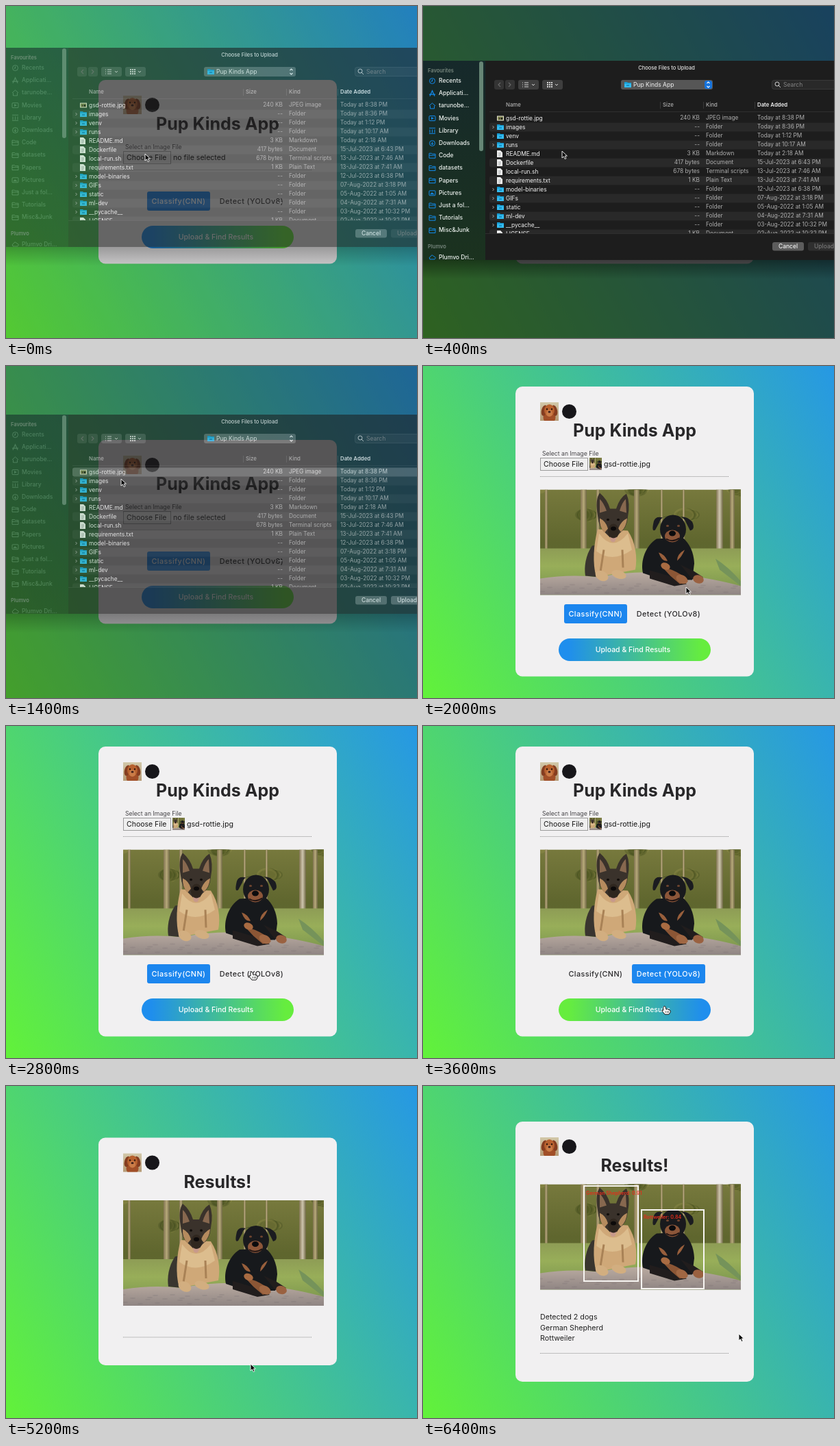
Write an HTML page with a canvas that moves like this. It is 600 px wide and 485 px high and loops after 6600 ms.

```html
<!DOCTYPE html>
<html lang="en">
<head>
<meta charset="utf-8">
<title>Dog classifier demo</title>
<style>
  html, body { margin: 0; width: 100%; height: 100%; overflow: hidden; }
  canvas { display: block; }
</style>
</head>
<body>
<canvas id="stage" width="600" height="485"></canvas>
<script>
const W = 600, H = 485, LOOP = 6600, STEP = 200;
const APP = 'Pup Kinds App';
const stage = document.getElementById('stage').getContext('2d');
const sheet = document.createElement('canvas');
sheet.width = W;
sheet.height = H;
const sheetCtx = sheet.getContext('2d');
let c = stage;

// Drawing helpers
function rect(x, y, w, h, fill) {
  c.fillStyle = fill;
  c.fillRect(x, y, w, h);
}
function round(x, y, w, h, r, fill, stroke) {
  c.beginPath();
  c.roundRect(x, y, w, h, r);
  if (fill) { c.fillStyle = fill; c.fill(); }
  if (stroke) { c.strokeStyle = stroke; c.stroke(); }
}
function oval(x, y, rx, ry, fill, turn = 0) {
  c.beginPath();
  c.ellipse(x, y, rx, ry, turn, 0, Math.PI * 2);
  c.fillStyle = fill;
  c.fill();
}
function shape(d, fill, stroke, width = 1) {
  const path = new Path2D(d);
  if (fill) { c.fillStyle = fill; c.fill(path); }
  if (stroke) { c.strokeStyle = stroke; c.lineWidth = width; c.stroke(path); }
}
function text(s, x, y, size, fill, { weight = 400, align = 'left', spacing = 0, base = 'alphabetic' } = {}) {
  c.font = `${weight} ${size}px Inter, sans-serif`;
  c.textAlign = align;
  c.textBaseline = base;
  c.letterSpacing = spacing + 'px';
  c.fillStyle = fill;
  c.fillText(s, x, y);
}
function blend(x0, y0, x1, y1, ...colors) {
  const g = c.createLinearGradient(x0, y0, x1, y1);
  colors.forEach((color, i) => g.addColorStop(i / (colors.length - 1), color));
  return g;
}
function at(x, y, draw, scale = 1) {
  c.save();
  c.translate(x, y);
  c.scale(scale, scale);
  draw();
  c.restore();
}
function faded(alpha, draw) {
  c.save();
  c.globalAlpha = alpha;
  draw();
  c.restore();
}

// Linear interpolation over rows of [time, ...values]
function track(keys, t) {
  const i = keys.findIndex(k => k[0] > t);
  if (i < 0) return keys[keys.length - 1].slice(1);
  const a = keys[i - 1], b = keys[i], f = (t - a[0]) / (b[0] - a[0]);
  return a.slice(1).map((v, n) => v + (b[n + 1] - v) * f);
}

function background() {
  const angle = Math.PI / 3, dx = Math.sin(angle), dy = -Math.cos(angle);
  const half = (W * dx - H * dy) / 2;
  rect(0, 0, W, H, blend(W / 2 - dx * half, H / 2 - dy * half,
    W / 2 + dx * half, H / 2 + dy * half, '#62f239', '#2698e4'));
}

// Picture of two dogs on a rock, 293 x 154
function shepherd() {
  shape('M76 82C66 96 64 114 66 126L96 129L94 80Z', '#39352f');
  shape('M84 58C78 80 76 108 82 128L139 117C142 100 140 78 128 60Z', '#cfa878');
  shape('M86 64Q106 92 128 64L134 88Q106 108 82 90Z', '#dcbd8e');
  shape('M93 88L88 120M120 88L121 114', null, '#a98256', 3);
  oval(90, 126, 10, 7, '#d2ae80', 0.5);
  oval(115, 124, 11, 6, '#d2ae80', 0.3);
  shape('M84 38Q80 14 87 5Q98 14 102 28L111 28Q116 12 126 6Q132 20 128 40Q127 56 116 64L107 75L97 65Q85 56 84 38Z', '#3a322b');
  shape('M87 14Q92 18 97 31L87 34ZM125 14Q120 18 116 31L126 34Z', '#87684f');
  shape('M87 42Q96 46 99 57L94 63Q86 54 87 42ZM127 42Q118 46 114 57L118 62Q126 54 127 42Z', '#b58b5e');
  oval(107, 61, 8, 11, '#30271f');
  oval(99, 44, 2, 1.7, '#120e0b');
  oval(114, 44, 2, 1.7, '#120e0b');
  oval(107, 57, 4, 3, '#0c0a0a');
  shape('M102 69Q107 73 112 69L109 76Q106 78 103 75Z', '#c89a8b');
}
function rottweiler() {
  shape('M170 72C154 82 146 104 150 122L180 132L222 132L225 108Q224 84 208 70Z', '#17191c');
  shape('M160 118L202 130L214 138L196 141L160 130ZM205 110L224 119L238 128L222 131Z', '#211d1d');
  shape('M173 92Q181 94 186 104Q178 106 173 92ZM211 88Q207 98 200 104Q200 94 211 88Z', '#985f3c');
  shape('M178 113Q193 116 207 125L216 134L204 138L190 126Z', '#8b5635');
  oval(183, 112, 7, 5, '#a86b42', 0.4);
  oval(207, 131, 9, 6, '#a06743', 0.5);
  oval(231, 131, 8, 6, '#9a6140', 0.3);
  shape('M166 46Q162 63 168 59L174 48Q176 38 193 38Q210 38 213 48L219 60Q227 58 222 47Q214 38 202 40Q190 36 179 41Q169 38 166 46Z', '#1b1c20');
  oval(194, 58, 19, 21, '#191a1d');
  oval(193, 68, 11, 9, '#8c5639');
  oval(193, 64, 5, 4, '#0b0b0d');
  shape('M184 72Q193 78 203 71', null, '#201413', 2);
  oval(186, 53, 2, 1.5, '#70452f');
  oval(202, 53, 2, 1.5, '#70452f');
}
function photo(x, y, scale = 1) {
  at(x, y, () => {
    c.beginPath();
    c.rect(0, 0, 293, 154);
    c.clip();
    rect(0, 0, 293, 154, blend(0, 0, 0, 154, '#77793d', '#5f662e', '#5d6a31'));
    for (let i = 0; i < 42; i++) {
      const px = (i * 73) % 293, py = (i * 37) % 74;
      oval(px, py, 8 + i % 8, 6 + i % 5, i % 3 ? 'rgba(61,73,27,.28)' : 'rgba(169,158,83,.24)');
    }
    [[7, 4], [59, 9], [82, 5], [137, 8], [176, 3], [208, 3], [257, 10], [277, 7]].forEach(([tx, tw], i) => {
      rect(tx, 0, tw, 90, blend(tx, 0, tx + tw, 0, '#817451', i === 6 ? '#cfc6af' : '#b6a87a', '#6d6742'));
    });
    rect(0, 86, 293, 68, blend(0, 84, 0, 140, '#8d9b55', '#98ae59', '#819b50'));
    shape('M256 101Q275 113 293 134L293 141L262 117Z', '#75935a');
    shape('M0 130Q45 123 85 128Q144 116 206 124Q258 131 293 141L293 154L0 154Z',
      blend(0, 122, 0, 154, '#b9aaa0', '#8f8583'));
    for (let i = 0; i < 35; i++) {
      oval((i * 47) % 293, 138 + i % 14, 4, 1, 'rgba(108,98,103,.18)');
    }
    shepherd();
    rottweiler();
  }, scale);
}
function avatar(x, y) {
  rect(x, y, 27, 27, blend(x, y, x, y + 27, '#d2c8a9', '#b59a75'));
  c.save();
  c.beginPath();
  c.rect(x, y, 27, 27);
  c.clip();
  oval(x + 13.5, y + 22, 9, 9, '#a14f28');
  oval(x + 6, y + 12, 4, 8, '#853d20', 0.25);
  oval(x + 21, y + 12, 4, 8, '#853d20', -0.25);
  oval(x + 13.5, y + 12, 7.5, 9, '#b7612f');
  oval(x + 13.5, y + 16, 4.5, 5, '#ca7c48');
  oval(x + 10, y + 10, 1.2, 1.2, '#30170d');
  oval(x + 17, y + 10, 1.2, 1.2, '#30170d');
  oval(x + 13.5, y + 14, 2, 1.5, '#40201a');
  c.restore();
}

// Web page
function card(y, h) {
  round(135, y, 348, h, 10, '#f1f0f1');
  avatar(171, y + 23);
  oval(213.5, y + 36.5, 10.5, 10.5, '#17161a');
}
function divider(y) {
  c.setLineDash([1, 1]);
  c.lineWidth = 1;
  c.strokeStyle = '#8c8c8c';
  c.beginPath();
  c.moveTo(171, y + 0.5);
  c.lineTo(447, y + 0.5);
  c.stroke();
  c.setLineDash([]);
}
function tab(label, x, w, y, active) {
  if (active) round(x, y, w, 28, 3, '#1c86ee');
  text(label, x + w / 2, y + 18, 10.8, active ? '#fff' : '#29282a',
    { weight: 500, align: 'center', spacing: 0.4 });
}
function formPage(loaded, detect, hover) {
  const y = loaded ? 30 : 108, controls = y + (loaded ? 318 : 163);
  card(y, loaded ? 423.5 : 268.5);
  text(APP, 309, y + 73, 25, '#282729', { weight: 700, align: 'center' });
  text('Select an Image File', 174, y + 101, 8.7, '#464548');
  c.lineWidth = 1;
  c.strokeStyle = '#9b9b9b';
  c.fillStyle = '#efefef';
  c.fillRect(171, y + 104, 69, 18);
  c.strokeRect(171.5, y + 104.5, 69, 18);
  text('Choose File', 176, y + 117, 10.5, '#161616');
  if (loaded) {
    c.save();
    c.beginPath();
    c.rect(243, y + 104, 18, 18);
    c.clip();
    photo(235, y + 104, 0.117);
    c.restore();
    text('gsd-rottie.jpg', 264, y + 117, 10.6, '#161616');
    photo(171, y + 150.5);
  } else {
    text('no file selected', 244, y + 117, 10.6, '#161616');
  }
  divider(y + 131);
  tab('Classify(CNN)', 206, 92, controls, !detect);
  tab('Detect (YOLOv8)', 305, 107, controls, detect);
  const ends = ['#1f8eed', '#66ed3e'];
  if (hover) ends.reverse();
  round(198, controls + 50, 222, 33, 16.5, blend(212, 0, 408, 0, ...ends));
  text('Upload & Find Results', 306.5, controls + 70, 10.5, '#fff', { weight: 500, align: 'center' });
}
function detection(label, x, y, w, h) {
  c.lineWidth = 2;
  c.strokeStyle = '#f7f5f2';
  c.strokeRect(x, y, w, h);
  text(label, x + 3, y + 13, 7.2, '#e12c1c', { weight: 600 });
}
function resultsPage(done) {
  const y = done ? 52 : 75.5;
  card(y, done ? 380 : 332.5);
  text('Results!', 309, y + 73, 25, '#282729', { weight: 700, align: 'center' });
  photo(171, y + 91.5);
  if (done) {
    detection('German Shepherd: 0.91', 235, 146, 79, 139);
    detection('Rottweiler: 0.84', 319, 181, 91, 115);
    ['Detected 2 dogs', 'German Shepherd', 'Rottweiler'].forEach((line, i) =>
      text(line, 171, y + 289 + i * 15.5, 10.7, '#202020'));
  }
  divider(y + (done ? 338 : 291));
}

// File chooser
const FILES = `gsd-rottie.jpg|240 KB|JPEG image|Today at 8:38 PM
images|--|Folder|Today at 8:36 PM
venv|--|Folder|Today at 1:12 PM
runs|--|Folder|Today at 10:17 AM
README.md|3 KB|Markdown|Today at 2:18 AM
Dockerfile|417 bytes|Document|15-Jul-2023 at 6:43 PM
local-run.sh|678 bytes|Terminal scripts|13-Jul-2023 at 7:46 AM
requirements.txt|1 KB|Plain Text|13-Jul-2023 at 7:41 AM
model-binaries|--|Folder|12-Jul-2023 at 6:38 PM
GIFs|--|Folder|07-Aug-2022 at 3:18 PM
static|--|Folder|05-Aug-2022 at 1:05 AM
ml-dev|--|Folder|04-Aug-2022 at 7:31 AM
__pycache__|--|Folder|03-Aug-2022 at 10:32 PM
LICENSE|1 KB|Document|02-Aug-2022 at 10:32 PM`.split('\n').map(line => line.split('|'));
const PLACES = ['Recents', 'Applicati...', 'tarunobe...', 'Movies', 'Library', 'Downloads', 'Code',
  'datasets', 'Papers', 'Pictures', 'Just a fol...', 'Tutorials', 'Misc&Junk'];
const mid = { base: 'middle' };

function folder(x, y) {
  shape(`M${x} ${y - 4}h4l1 1h5v7h-10z`, '#159bd3');
  rect(x, y - 1.5, 10, 5.5, '#35bcf0');
  rect(x + 3, y, 4, 2, '#178fc6');
}
function paper(x, y) {
  shape(`M${x + 1} ${y - 5}h5l3 3v7h-8z`, '#eeeeee');
  shape(`M${x + 3} ${y - 1}h4M${x + 3} ${y + 1}h4M${x + 3} ${y + 3}h3`, null, '#8d9295', 0.7);
}
function placeIcon(i, y, color) {
  if (i === 0 || i === 5) {
    shape(`M9.5 ${y}a4 4 0 1 0 8 0a4 4 0 1 0 -8 0`, null, color);
    shape(i ? `M13.5 ${y - 2}v4m-2 -2l2 2l2 -2` : `M13.5 ${y - 2.5}v3h-2`, null, color);
  } else if (i === 1) {
    shape(`M10 ${y + 4}l3.5 -8l3.5 8M9 ${y + 1.5}h9`, null, color, 1.2);
  } else if (i === 2) {
    shape(`M9 ${y}l4.5 -4l4.5 4M10.5 ${y}v4h6v-4`, null, color);
  } else if (i === 4) {
    shape(`M9 ${y - 4}h9M10 ${y - 2}v5M13.5 ${y - 2}v5M17 ${y - 2}v5M9 ${y + 4}h9`, null, color);
  } else if (i === 3 || i === 9) {
    c.lineWidth = 1;
    round(9, y - 3.5, 9, 7, 1, null, color);
    shape(i === 3 ? `M12 ${y - 2}l4 2l-4 2z` : `M10 ${y + 2}l3 -3l4 3z`, color);
  } else {
    shape(`M9 ${y - 3.5}h3.5l1 1h4.5v6h-9zM9 ${y - 0.5}h9`, null, color);
  }
}
function sidebar(active) {
  const icon = active ? '#128bed' : '#a9d8bd';
  const label = active ? '#edf2ef' : '#a9d8bd';
  round(82, 81, 6, 131, 3, '#668575');
  text('Favourites', 7, 94.5, 7.5, '#76867d', { ...mid, weight: 600 });
  text('Plumvo', 7, 352, 7.5, '#76867d', { ...mid, weight: 600 });
  faded(active ? 1 : 0.34, () => {
    PLACES.forEach((name, i) => {
      const y = 109.5 + i * 18.2;
      placeIcon(i, y, icon);
      text(name, 23, y, 8.5, label, { ...mid, weight: 500 });
    });
    shape('M10 370q-2 -3 1 -4q2 -4 5 0q4 1 1 4z', null, icon);
    text('Plumvo Dri...', 23, 367, 8.5, label, { ...mid, weight: 500 });
  });
}
function toolbar(active) {
  text('Choose Files to Upload', 355.5, 91, 7.5, '#e4e4e4', { ...mid, weight: 500, align: 'center' });
  round(104, 108, 14, 14, 3, 'rgba(255,255,255,.1)');
  round(120, 108, 14, 14, 3, 'rgba(255,255,255,.1)');
  shape('M113 112l-3 3l3 3M125 112l3 3l-3 3', null, '#6b6b6b', 1.1);
  round(139, 108, 30, 14, 3, 'rgba(255,255,255,.15)');
  round(174, 108, 30, 14, 3, 'rgba(255,255,255,.15)');
  shape('M148 112h6M148 115h6M148 118h6M145 112h1M145 115h1M145 118h1M159 114l2 2l2 -2M193 114l2 2l2 -2', null, '#d4d4d4');
  for (let i = 0; i < 9; i++) rect(181 + i % 3 * 3, 111 + Math.floor(i / 3) * 3, 2, 2, '#d4d4d4');
  round(289, 108, 134, 14, 3, 'rgba(255,255,255,.25)');
  folder(294, 115);
  text(APP, 307, 115, 8.5, '#f2f2f2', mid);
  if (active) round(411, 109, 11, 12, 3, '#1673dc');
  shape('M414.5 113l2 -2l2 2M414.5 117l2 2l2 -2', null, '#fff', 1.1);
  c.lineWidth = 1;
  round(509.5, 108.5, 95, 13, 3, 'rgba(255,255,255,.05)', 'rgba(255,255,255,.1)');
  shape('M514 114a3 3 0 1 0 6 0a3 3 0 1 0 -6 0M519 116l3 3', null, '#d0d0d0');
  text('Search', 526, 115, 8.5, '#858585', mid);
}
function columns() {
  [['Name', 121], ['Size', 350], ['Kind', 413], ['Date Added', 488]].forEach(([label, x], i) => {
    text(label, x, 145, 7.8, i === 3 ? '#f0f0f0' : '#b0b0b0', { ...mid, weight: i === 3 ? 600 : 500 });
    if (i) rect(x - 4, 140, 1, 10, 'rgba(255,255,255,.12)');
  });
  rect(97, 154, 503, 1, 'rgba(255,255,255,.08)');
}
function fileRow([name, size, kind, date], i, selected) {
  const y = 164 + i * 13;
  if (selected || i % 2) round(97, y - 6.5, 510, 13, 3, `rgba(255,255,255,${selected ? 0.24 : 0.05})`);
  if (i === 0) {
    rect(108, y - 3.5, 10, 7, '#e8e3d2');
    rect(109, y - 2.5, 8, 5, '#7a814b');
    rect(111, y - 1, 2, 3, '#514737');
    rect(114, y - 1, 2, 3, '#191919');
  } else if (kind === 'Folder') {
    shape(`M101.5 ${y - 2}l2 2l-2 2`, null, '#a6a6a6');
    folder(108, y);
  } else {
    paper(107, y);
  }
  const soft = selected ? '#e4e4e4' : '#b0b0b0';
  text(name, 121, y, 8.4, '#f4f4f4', mid);
  text(size, 404, y, 8.3, soft, { ...mid, align: 'right' });
  text(kind, 413, y, 8.3, soft, mid);
  text(date, 488, y, 8.3, soft, mid);
}
function chooser(selected, active, backing) {
  c = sheetCtx;
  c.clearRect(0, 0, W, H);
  faded(backing, () => {
    rect(91, 80, 509, 291, '#1d1d1d');
    rect(0, 80, 91, 291, blend(0, 80, 0, 371, '#16292b', '#1b321f'));
  });
  sidebar(active);
  toolbar(active);
  columns();
  c.save();
  c.beginPath();
  c.rect(91, 155, 509, 177);
  c.clip();
  FILES.forEach((file, i) => fileRow(file, i, selected && i === 0));
  c.restore();
  rect(91, 332, 509, 1, 'rgba(255,255,255,.08)');
  round(510, 345, 46, 12.5, 3, 'rgba(255,255,255,.28)');
  text('Cancel', 533, 351, 8.5, '#f2f2f2', { ...mid, weight: 500, align: 'center' });
  round(562, 345, 48, 12.5, 3, `rgba(255,255,255,${selected ? 0.28 : 0.08})`);
  text('Upload', 571, 351, 8.5, selected ? '#f2f2f2' : '#777', { ...mid, weight: 500 });
  c = stage;
}

// Time, vertical offset, panel opacity, content opacity, page dimming
const SHEET = [[0, -19, 0.58, 0.8, 0.18], [200, -3, 0.92, 0.96, 0.5], [400, 0, 1, 1, 0.64],
  [1200, 0, 1, 1, 0.64], [1400, -9, 0.56, 0.8, 0.37], [1600, -22, 0.1, 0.14, 0.08], [1800, -24, 0, 0, 0]];
const POINTER = [[0, 203, 216], [400, 203, 212], [600, 199, 202], [1000, 170, 168], [1400, 168, 165],
  [1800, 325, 283], [2000, 384, 323], [2400, 380, 338], [2800, 358, 359], [3000, 357, 361],
  [3400, 352, 409], [4200, 352, 410], [4600, 355, 408], [4800, 356, 407], [5200, 357, 406],
  [5800, 390, 393], [6400, 461, 362]];

function overlay(t) {
  const [shift, panel, content, dim] = track(SHEET, t);
  if (!content) return;
  rect(0, 0, W, H, `rgba(18,18,20,${dim})`);
  const bottom = 371 + shift;
  rect(0, bottom, W, 28, blend(0, bottom, 0, bottom + 28, `rgba(0,0,0,${panel * 0.4})`, 'rgba(0,0,0,0)'));
  chooser(t >= 1000, t >= 200 && t < 1400, panel / content);
  faded(content, () => c.drawImage(sheet, 0, shift));
}
function cursor(x, y, hand) {
  at(x, y, () => {
    c.lineJoin = 'round';
    if (hand) {
      shape('M-1 1Q1 -1 2 1L3 5Q5 3 6 5Q8 4 8 6Q10 6 9 9L7 12H1L-3 7Q-4 5 -1 6Z', '#fff', '#161616', 1);
      shape('M2 7v3M4.5 7v3M6.5 7v3', null, '#161616', 0.7);
    } else {
      shape('M0 0V10L2.4 7.8L4.2 11.5L6 10.6L4.3 7H7.4Z', '#080808', '#fff', 0.9);
    }
  });
}

function render(now) {
  const t = Math.floor((now % LOOP) / STEP) * STEP;
  const [x, y] = track(POINTER, t);
  const results = t >= 4600;
  const hover = t >= 3200 && !results;
  background();
  if (results) resultsPage(t >= 5800);
  else formPage(t >= 1800, t >= 3000, hover);
  overlay(t);
  cursor(x, y, hover || (t >= 2800 && t < 3200));
}

const start = performance.now();
function tick() {
  render(performance.now() - start);
  requestAnimationFrame(tick);
}
tick();
</script>
</body>
</html>
```
